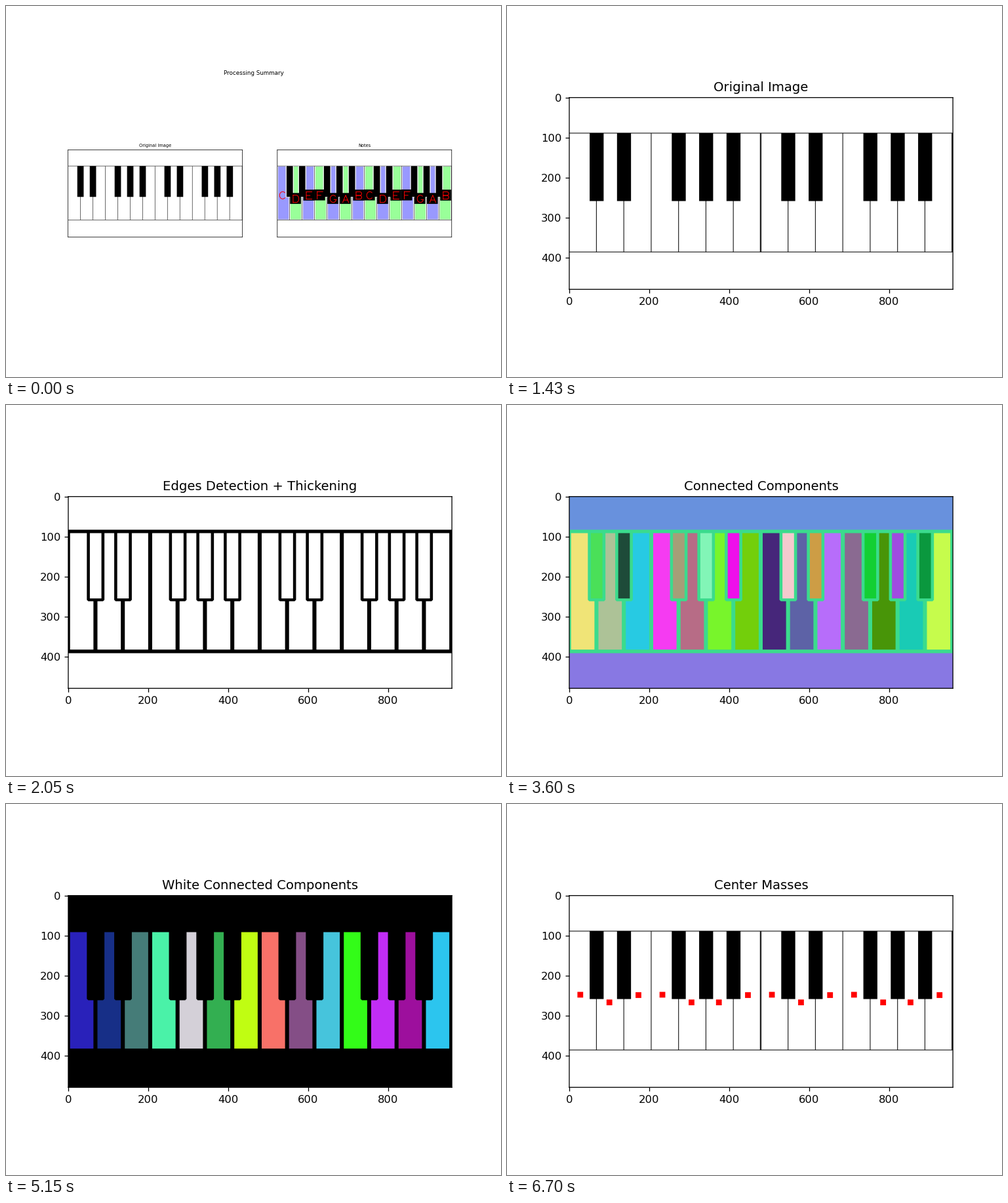
Recreate the animation shown at these times as a matplotlib script. Size 755 px wide and 566 px high, loop 8000 ms.

```python
import numpy as np
import matplotlib.pyplot as plt
from matplotlib.animation import FuncAnimation
from matplotlib.patches import Polygon, Rectangle

W, H, DPI = 755, 566, 128
STEP, LOOP = 50, 8000
FIRST, HOLD = 500, 1550  # ms for the summary, then for each stage

K = W / 640 * 100 / DPI  # default point sizes of a 640 px wide figure
plt.rcParams.update({
    "font.family": "DejaVu Sans", "font.size": 10 * K, "path.snap": False,
    "axes.titlepad": 6 * K, "axes.linewidth": 0.8 * K,
})
for side in ("xtick", "ytick"):
    plt.rcParams.update({f"{side}.major.size": 3.5 * K, f"{side}.major.width": 0.8 * K,
                         f"{side}.major.pad": 3.5 * K})

# Keyboard geometry in a 960 x 480 picture: two octaves of evenly spaced keys
KEYS, PITCH = 14, 68.5
SEPS = PITCH * np.arange(KEYS + 1) - 0.5
BLACK_W, TOP, KEY_END, BOTTOM = 35, 89, 259, 386.5
BLACKS = [SEPS[k] - 17 for k in range(1, KEYS) if k % 7 not in (0, 3)]
GAP, RIM = 5, 4.5  # half a separator, margin around a black key
FILL_TOP, NOTCH, FILL_END = 91.5, 262, 383

SEGMENT_WHITES = ("#f0e477 #adc297 #27cae3 #f53bf2 #b76c86 #78f52b #73cf0b "
                  "#46267a #5d62a6 #b76dfa #8a6a91 #489508 #19cbb5 #c6fc4c").split()
SEGMENT_BLACKS = ("#4ae058 #1e4b39 #a69e78 #82f5b7 #ee0fea "
                  "#f5cace #cd9d45 #13cf33 #a04be0 #0a983e").split()
WHITE_ONLY = ("#2921ba #172f87 #457c78 #4af2a8 #d4d0d8 #33af51 #c0fd12 "
              "#f87168 #844e86 #46c4dc #33fc18 #c12df5 #9d0f9d #2cc5ee").split()


def arc(cx, cy, rx, ry, start, end):
    a = np.radians(np.linspace(start, end, 16))
    return list(zip(cx + rx * np.cos(a), cy - ry * np.sin(a)))


STEM = [(-0.9, -1), (-0.9, 1)]
TOP_BAR, MID_BAR = [(-0.9, -1), (0.9, -1)], [(-0.9, 0), (0.3, 0)]
BOWL = arc(0, 0, 1, 1, 45, 315)
GLYPHS = {
    "A": [[(-0.95, 1), (0, -1), (0.95, 1)], [(-0.6, 0.35), (0.6, 0.35)]],
    "B": [STEM] + [[(-0.9, y - 0.5)] + arc(0.3, y, 0.6, 0.5, 90, -90) + [(-0.9, y + 0.5)]
                   for y in (-0.5, 0.5)],
    "C": [BOWL],
    "D": [STEM, STEM[:1] + arc(0.1, 0, 0.85, 1, 90, -90) + STEM[1:]],
    "E": [STEM, TOP_BAR, MID_BAR, [(-0.9, 1), (0.9, 1)]],
    "F": [STEM, TOP_BAR, MID_BAR],
    "G": [BOWL + [(1, 0.2), (0.25, 0.2)]],
}


def pt(px):
    return px * 72 / DPI


def center_of_mass(k):
    """Centroid of a white key: a full-width block under a narrower neck."""
    a, b = SEPS[k] + GAP, SEPS[k + 1] - GAP
    left = max([a] + [x + BLACK_W + RIM for x in BLACKS if x < a])
    right = min([b] + [x - RIM for x in BLACKS if x + BLACK_W > b])
    neck, block = (right - left) * (NOTCH - FILL_TOP), (b - a) * (FILL_END - NOTCH)
    mix = neck / (neck + block)
    x = mix * (left + right) / 2 + (1 - mix) * (a + b) / 2
    y = mix * (FILL_TOP + NOTCH) / 2 + (1 - mix) * (NOTCH + FILL_END) / 2
    return x - 2, y - 1


CENTERS = [center_of_mass(k) for k in range(KEYS)]


def rect(ax, x0, y0, x1, y1, color):
    ax.add_patch(Rectangle((x0, y0), x1 - x0, y1 - y0, fc=color, lw=0))


def square(ax, x, y, r, color):
    rect(ax, x - r, y - r, x + r, y + r, color)


def panel(left, width):
    height = width / 2
    bottom = 0.495 * H - 0.15 - height / 2
    ax = fig.add_axes([left / W, bottom / H, width / W, height / H])
    ax.set(xlim=(0, 960), ylim=(480, 0))
    ax.unit = 960 / width  # picture units per screen pixel
    return ax


def main_panel(title):
    ax = panel(0.125 * W + 0.6, 0.775 * W)
    ax.set_title(title)
    ax.set_xticks(range(0, 801, 200))
    ax.set_yticks(range(0, 401, 100))
    return ax


def small_panel(left, title):
    ax = panel(left + 0.25, 0.775 * W / 2.2)
    ax.set_title(title, fontsize=pt(6.6), pad=pt(4.4))
    ax.set_xticks([])
    ax.set_yticks([])
    for spine in ax.spines.values():
        spine.set_linewidth(pt(0.75))
    return ax


def lines(ax, px=1.18, octave=2, color="#222222"):
    w = px * ax.unit / 2
    for k in range(1, KEYS + 1):
        r = w * octave if k % 7 == 0 else w
        rect(ax, SEPS[k] - r, TOP, SEPS[k] + r, BOTTOM, color)
    for y in (TOP, BOTTOM):
        rect(ax, 0, y - w, 960, y + w, color)


def black_keys(ax):
    for x in BLACKS:
        rect(ax, x, TOP, x + BLACK_W, KEY_END, "black")


def white_areas(ax, colors, around):
    for a, b, color in zip(SEPS, SEPS[1:], colors):
        rect(ax, a + GAP, FILL_TOP, b - GAP, FILL_END, color)
    c = 3.5
    for x in BLACKS:
        x0, x1 = x - RIM, x + BLACK_W + RIM
        ax.add_patch(Polygon([(x0, TOP), (x1, TOP), (x1, NOTCH - c), (x1 - c, NOTCH),
                              (x0 + c, NOTCH), (x0, NOTCH - c)], fc=around, lw=0))


def summary():
    left = small_panel(0.125 * W, "Original Image")
    right = small_panel(0.9 * W - 0.775 * W / 2.2, "Notes")
    for ax in (left, right):
        lines(ax, 0.8, 1, "#444444")
    white_areas(right, ["#9999ff", "#99ff99"] * 7, "white")
    for ax in (left, right):
        black_keys(ax)
    for x, y in CENTERS[1:]:
        square(right, x, y, 30, "black")
    for (x, y), name in zip(CENTERS, "CDEFGAB" * 2):
        for stroke in GLYPHS[name]:
            p = np.array(stroke) * (17, 20) + (x + 2, y + 2)
            right.plot(*p.T, color="red", lw=pt(1), scalex=False, scaley=False)
    head = fig.text(0.5, 1 - 105.3 / H, "Processing Summary", ha="center", fontsize=pt(8.74))
    return [left, right, head]


def piano(title, dots=False):
    ax = main_panel(title)
    lines(ax)
    black_keys(ax)
    if dots:
        for x, y in CENTERS:
            square(ax, x, y, 7.2, "red")
    return [ax]


def segments(title, whites, blacks, edge, above, below):
    ax = main_panel(title)
    rect(ax, 0, 0, 960, 480, edge)
    rect(ax, 0, 0, 960, 83, above)
    rect(ax, 0, 392, 960, 480, below)
    white_areas(ax, whites, edge)
    for x, color in zip(BLACKS, blacks):
        rect(ax, x + 3, FILL_TOP, x + BLACK_W - 3, NOTCH - 7, color)
    return [ax]


fig = plt.figure(figsize=(W / DPI, H / DPI), dpi=DPI, facecolor="white")
scenes = [
    summary(),
    piano("Original Image"),
    segments("Edges Detection + Thickening", ["white"] * 14, ["white"] * 10,
             "black", "white", "white"),
    segments("Connected Components", SEGMENT_WHITES, SEGMENT_BLACKS,
             "#3bdb8d", "#6891dd", "#8878e3"),
    segments("White Connected Components", WHITE_ONLY, ["black"] * 10,
             "black", "black", "black"),
    piano("Center Masses", dots=True),
]


def update(i):
    current = (i * STEP - FIRST) // HOLD + 1
    for n, scene in enumerate(scenes):
        for artist in scene:
            artist.set_visible(n == current)
    return []


anim = FuncAnimation(fig, update, frames=LOOP // STEP, interval=STEP,
                     init_func=lambda: update(0), repeat=True, repeat_delay=0)
plt.show()
```
